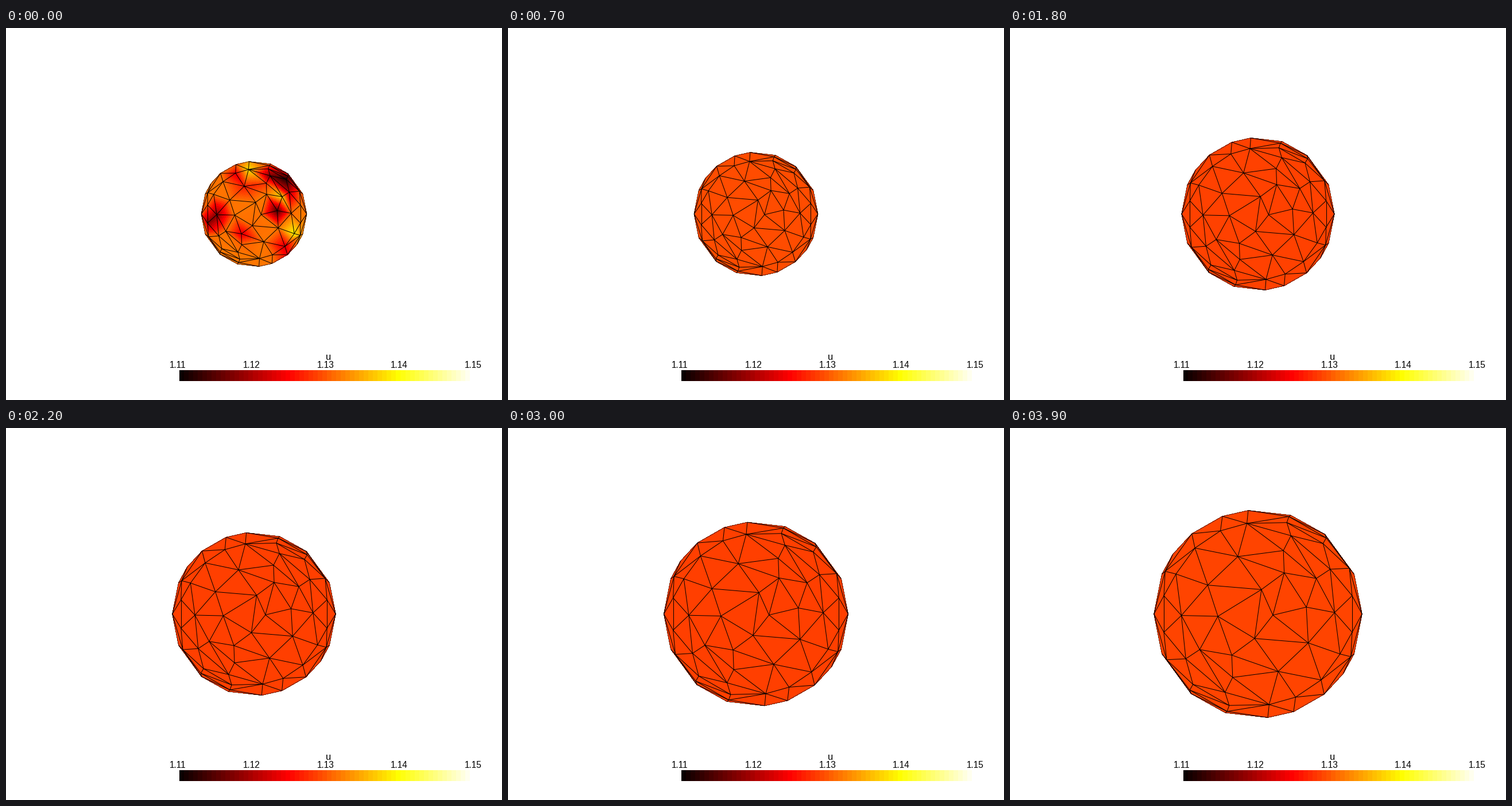
Animation, 864 px wide and 648 px high, one loop 4 s. Source, as a matplotlib script:

```python
import numpy as np
import matplotlib.pyplot as plt
from matplotlib.animation import FuncAnimation
from matplotlib.collections import LineCollection, PolyCollection
from matplotlib.tri import Triangulation

W, H = 864, 648
FRAMES = 40
CENTER = np.array([W / 2, H / 2])
CAMERA = 1700
R_START, R_END = 91.8, 181.2
NOISY_FRAMES = 7
REST = 0.4635
HOT = plt.get_cmap("hot")

# Screen radius at full size -> vertex angles in degrees.
# Each paired vertex has a twin half a turn away.
PAIRED = {R_END: (-70, -50.5, -35, -22.5, 0, 22.5, 50, 71.7, 95.4),
          178: (26.6, 48.1, 72.4, 155.3),
          167: (-11, 11, 47.3, 72.5),
          159: (97, 114.3, 133.7, 154),
          148: (31.8, 67.2),
          133.5: (1.1,),
          119: (31.4, 68.2),
          106: (109.4,),
          101: (150.1,),
          85: (57.5,),
          43: (82,)}
SINGLE = {85: (8.1,), 70: (183.3,), 26: (-4.4,)}

# Hot and cold spots of the starting field: x, y, strength
SPOTS = [(.42, -.07, -.45), (.59, -.65, -.47), (.30, -.72, -.38),
         (.66, -.41, -.35), (-.70, .01, -.34), (-.87, .16, -.32),
         (.59, .68, -.32), (-.23, .35, -.22), (-.35, -.77, -.22),
         (-.18, -.53, -.14), (.52, -.33, .27), (.72, .37, .20),
         (-.11, -.85, .18)]


def ring_points(rings, turns):
    polar = [(r, np.radians(a + t)) for r, angles in rings.items()
             for a in angles for t in turns]
    return np.array([(r * np.cos(a), -r * np.sin(a)) for r, a in polar])


def ball_normals(p):
    """Cast rays through screen points onto the front of the full-size ball."""
    rho = np.hypot(*p.T)
    k = rho / CAMERA
    a, b, c = 1 + k**2, rho * k, rho**2 - R_END**2
    front = (b + np.sqrt(np.maximum(b**2 - a * c, 0))) / a
    z = np.where(rho < R_END - 0.1, front, 0)
    n = np.column_stack([p * (1 - z / CAMERA)[:, None], z])
    return n / np.linalg.norm(n, axis=1, keepdims=True)


normals = ball_normals(np.vstack([ring_points(PAIRED, (0, 180)),
                                  ring_points(SINGLE, (0,))]))

# A stereographic view turns the spherical Delaunay mesh into a planar one
mesh = Triangulation(*(normals[:, :2] / (1 + normals[:, 2:])).T)
on_rim = (normals[mesh.edges, 2] == 0).all(axis=1)

start = np.full(len(normals), 0.54)
for x, y, strength in SPOTS:
    dist = np.hypot(normals[:, 0] - x, normals[:, 1] - y)
    start += strength * np.exp(-(dist / 0.15)**2)


def subdivision(k):
    """Barycentric corners of the k*k small triangles inside a triangle."""
    cells = []
    for i in range(k):
        for j in range(k - i):
            cells.append([(i, j), (i + 1, j), (i, j + 1)])
            if i + j < k - 1:
                cells.append([(i + 1, j), (i + 1, j + 1), (i, j + 1)])
    uv = np.array(cells) / k
    return np.dstack([uv, 1 - uv.sum(axis=2)])


FINE, COARSE = subdivision(9), subdivision(1)


def project(radius):
    p = normals * radius
    return CENTER + p[:, :2] / (1 - p[:, 2:] / CAMERA)


def field(i):
    """Noise that dies out quickly over a damped swing of the mean."""
    if i < NOISY_FRAMES:
        return REST + (start - REST) * 0.5**i
    swing = 0.022 * np.exp(-i / 18) * np.cos(2 * np.pi * (i - 7) / 6.4)
    return np.full(len(normals), REST + swing)


fig = plt.figure(figsize=(W / 72, H / 72), dpi=72, facecolor="white")
ax = fig.add_axes([0, 0, 1, 1])
ax.axis("off")

ax.imshow(np.arange(64)[None, :] / 63, cmap=HOT, vmin=0, vmax=1, aspect="auto",
          extent=(302, 816, 615, 596), interpolation="nearest")
ax.set_xlim(0, W)
ax.set_ylim(H, 0)


def label(x, y, text, size):
    ax.text(x, y, text, ha="center", va="baseline", fontsize=size,
            family="Liberation Sans")


for k in range(5):
    label(299 + 128.75 * k, 591.5, f"{1.11 + 0.01 * k:.2f}", 15.5)
label(561.5, 578.5, "u", 16.5)

faces = PolyCollection([], linewidths=0, antialiaseds=False, zorder=2)
wires = LineCollection([], colors="black", zorder=3,
                       linewidths=np.where(on_rim, 0.6, 1.0))
ax.add_collection(faces, autolim=False)
ax.add_collection(wires, autolim=False)


def draw(i):
    pts = project(R_START + (R_END - R_START) * i / (FRAMES - 1))
    cells = FINE if i < NOISY_FRAMES else COARSE
    tris = mesh.triangles
    polys = np.einsum("cvk,tkd->tcvd", cells, pts[tris]).reshape(-1, 3, 2)
    shade = np.einsum("ck,tk->tc", cells.mean(axis=1), field(i)[tris]).ravel()
    faces.set_verts(polys)
    faces.set_facecolor(HOT(np.clip(shade, 0, 1)))
    wires.set_segments(pts[mesh.edges])
    return faces, wires


anim = FuncAnimation(fig, draw, frames=FRAMES, interval=100, repeat=True,
                     repeat_delay=0, blit=False)
plt.show()
```
